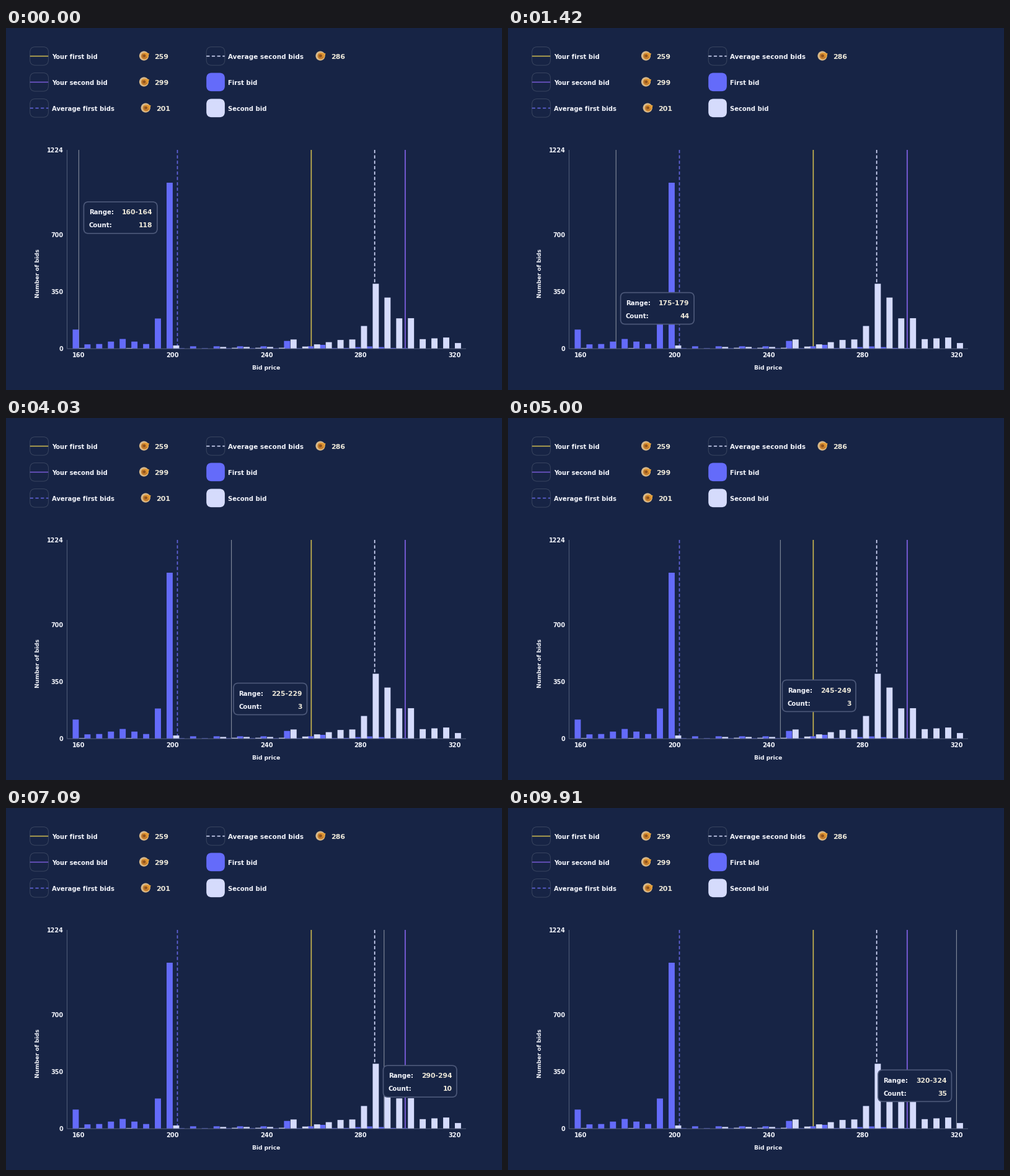
Recreate the animation shown at these times as a matplotlib script. Size 800 by 585 pixels, loop 9940 ms.

```python
import numpy as np
import matplotlib.pyplot as plt
from matplotlib.animation import FuncAnimation
from matplotlib.collections import PatchCollection
from matplotlib.patches import Arc, Circle, FancyBboxPatch, Polygon, Rectangle

W, H, DPI = 800, 585, 100
FRAMES, INTERVAL = 355, 28
PX = 72 / DPI  # points per pixel

BG = "#172445"
FIRST, SECOND = "#646bfa", "#d5dbfc"
YELLOW, PURPLE, DASH_BLUE = "#c9b64f", "#7459d2", "#6264dd"
AXIS, TEXT, CREAM = "#4b5674", "#f1f3fa", "#ece7d8"
TOP, BASE, LEFT, RIGHT = 197, 518.3, 98.5, 742
TIP_W, TIP_H, TIP_GAP = 118.5, 51, 8
DASH = (5.2, 3.5)

plt.rcParams["font.family"] = "DejaVu Sans"
plt.rcParams["font.weight"] = "bold"
fig = plt.figure(figsize=(W / DPI, H / DPI), dpi=DPI, facecolor=BG)
ax = fig.add_axes([0, 0, 1, 1])
ax.set_xlim(0, W)
ax.set_ylim(H, 0)
ax.axis("off")

FIRST_PEAKS = {160: 118, 195: 186, 200: 1022, 250: 48, 265: 24}
SECOND_PEAKS = {200: 20, 250: 57, 280: 140, 285: 400, 290: 315, 295: 187,
                300: 188, 320: 35}


def bump(p, centre, width):
    return np.exp(-((p - centre) / width) ** 2)


def first_count(p):
    if p in FIRST_PEAKS:
        return FIRST_PEAKS[p]
    if p < 200:
        return round(27 + 33 * bump(p, 180, 6.14))
    if p < 270:
        return 3 if p % 10 else 15
    if p <= 300:
        return round(4 + 10 * bump(p, 285, 7))
    return int(p < 320)


def second_count(p):
    if p in SECOND_PEAKS:
        return SECOND_PEAKS[p]
    if p < 220:
        return 0 if p % 20 else 4
    if p < 250:
        return 6 if p % 10 else 11
    if p < 280:
        return min(2.7 * (p - 250), 57)
    return p - 246


def shown_count(p):
    a, b = first_count(p), second_count(p)
    return b if a == 0 or p == 200 else a


def x_of(price):
    return 117.4 + (price - 160) * 3.7875


def y_of(count):
    return BASE - count * (BASE - TOP) / 1224


def text(x, y, s, size=10, color=TEXT, ha="left", z=5, **kw):
    return ax.text(x, y, s, fontsize=size * PX, color=color, ha=ha, zorder=z,
                   va=kw.pop("va", "baseline"), **kw)


def line(x0, y0, x1, y1, color, width=1.0, dash=None, z=1):
    style = (0, tuple(d / (width * PX) * PX for d in dash)) if dash else "-"
    return ax.plot([x0, x1], [y0, y1], color=color, lw=width * PX, ls=style,
                   dash_capstyle="butt", solid_capstyle="butt", snap=False,
                   zorder=z)[0]


def rounded(x, y, w, h, r, face, edge, width=1.0, z=2):
    box = FancyBboxPatch((x, y), w, h, boxstyle=f"round,pad=0,rounding_size={r}",
                         fc=face, ec=edge, lw=width * PX, snap=False, zorder=z)
    return ax.add_patch(box)


def shell(x, y):
    ax.add_patch(Circle((x, y), 7.6, fc="#d8b98a", ec="none", zorder=3))
    ax.add_patch(Polygon([(x + 1, y - 5), (x + 8.5, y - 4), (x + 6, y + 4)],
                         fc="#e6a23c", ec="none", zorder=3))
    ax.add_patch(Circle((x + 0.8, y + 0.3), 5.4, fc="#de9330", ec="none", zorder=3))
    ax.add_patch(Circle((x + 0.4, y), 2.5, fc="#8f531f", ec="none", zorder=3))
    ax.add_patch(Arc((x + 0.8, y), 8, 8, theta1=20, theta2=230, color="#a8652a",
                     lw=PX, zorder=3))


def legend_row(x, row, label, color, size=10, dash=None, value=None, value_x=0):
    y = 45 + 42 * row
    box = (x, y - 14.5, 29.7, 29.7, 8.5)
    if value is None:
        rounded(*box, color, "none")
    else:
        rounded(*box, "none", "#38445f")
        line(x, y + 0.5, x + 29.5, y + 0.5, color, 1.6, dash, z=3)
        shell(value_x - 16.8, y)
        text(value_x, y + 5.3, value, 11, CREAM)
    text(x + 35.3, y + 5.2, label, size)


legend_row(38.7, 0, "Your first bid", YELLOW, value="259", value_x=239.3)
legend_row(38.7, 1, "Your second bid", PURPLE, value="299", value_x=239.3)
legend_row(38.7, 2, "Average first bids", DASH_BLUE, dash=DASH,
           value="201", value_x=242)
legend_row(323.2, 0, "Average second bids", SECOND, 10.4, dash=DASH,
           value="286", value_x=523.8)
legend_row(323.2, 1, "First bid", FIRST)
legend_row(323.2, 2, "Second bid", SECOND)

# Axes
line(LEFT, TOP, LEFT, BASE, AXIS, 1.2)
line(LEFT, BASE, RIGHT, BASE, AXIS, 1.2, z=4)
for tick in (0, 350, 700, 1224):
    text(92.5, y_of(tick) + 3.8, str(tick), 9.6, ha="right")
for tick in range(160, 321, 40):
    text(x_of(tick), 532, str(tick), 9.9, ha="center")
text(420, 552.3, "Bid price", 9.2, ha="center")
text(51, 396.5, "Number of bids", 9.1, ha="center", va="center", rotation=90)

# Reference lines
for price, color, width, dash in ((259, YELLOW, 1.7, None), (299, PURPLE, 2, None),
                                  (202, DASH_BLUE, 1.7, DASH), (286, SECOND, 1.7, DASH)):
    line(x_of(price), TOP, x_of(price), BASE, color, width, dash)


def bars(count, shift, color):
    rects = [Rectangle((x_of(p) + shift, y_of(count(p))), 9.9, BASE - y_of(count(p)))
             for p in range(160, 325, 5)]
    ax.add_collection(PatchCollection(rects, fc=color, ec="none", lw=0,
                                      snap=False, zorder=3))


bars(first_count, -9.9, FIRST)
bars(second_count, 0.6, SECOND)


def hovered(t):
    price = np.interp(t, [0, 1450, 4060, 7900, 8700], [160, 180, 230, 310, 320])
    return int((price + 1e-6) // 5 * 5)


def tip_top(t):
    return np.interp(t, [0, 1100, 4030, 5940, 8240, 9910],
                     [281, 427.5, 428.5, 418.3, 414, 423.5])


# CSS "ease" timing curve
s = np.linspace(0, 1, 101)
ease_x = 0.75 * s * (1 - s) + s**3
ease_y = 0.3 * s * (1 - s)**2 + 3 * s**2 * (1 - s) + s**3


def tip_target(price):
    x = x_of(price)
    if x + TIP_GAP + TIP_W > RIGHT:
        return x - TIP_GAP - TIP_W
    return x + TIP_GAP


def build_track():
    """Hovered price and tooltip corner per frame; each hop eases over 400 ms."""
    track = []
    price, began = 160, -400
    x = start = tip_target(price)
    for i in range(FRAMES):
        t = i * INTERVAL
        if hovered(t) != price:
            price, start, began = hovered(t), x, t
        k = np.interp((t - began) / 400, ease_x, ease_y)
        x = start + (tip_target(price) - start) * k
        track.append((price, x, tip_top(t)))
    return track


track = build_track()

cursor = line(0, TOP, 0, BASE, "#858d9e", 1.1, z=2)
tip = rounded(0, 0, TIP_W, TIP_H, 7.5, BG, "#4c5879", 1.7, z=6)
range_label = text(0, 0, "Range:", 10.1, z=7)
count_label = text(0, 0, "Count:", 10.1, z=7)
range_value = text(0, 0, "", 10.8, CREAM, "right", z=7)
count_value = text(0, 0, "", 10.8, CREAM, "right", z=7)


def update(i):
    price, x, y = track[i]
    cursor.set_xdata([x_of(price)] * 2)
    tip.set_bounds(x, y, TIP_W, TIP_H)
    range_label.set_position((x + 8.3, y + 20.3))
    count_label.set_position((x + 8.3, y + 41.3))
    range_value.set_position((x + 111, y + 20.3))
    count_value.set_position((x + 111, y + 41.3))
    range_value.set_text(f"{price}-{price + 4}")
    count_value.set_text(str(shown_count(price)))
    return cursor, tip, range_label, count_label, range_value, count_value


anim = FuncAnimation(fig, update, frames=FRAMES, interval=INTERVAL,
                     repeat=True, repeat_delay=0, blit=False)
plt.show()
```
